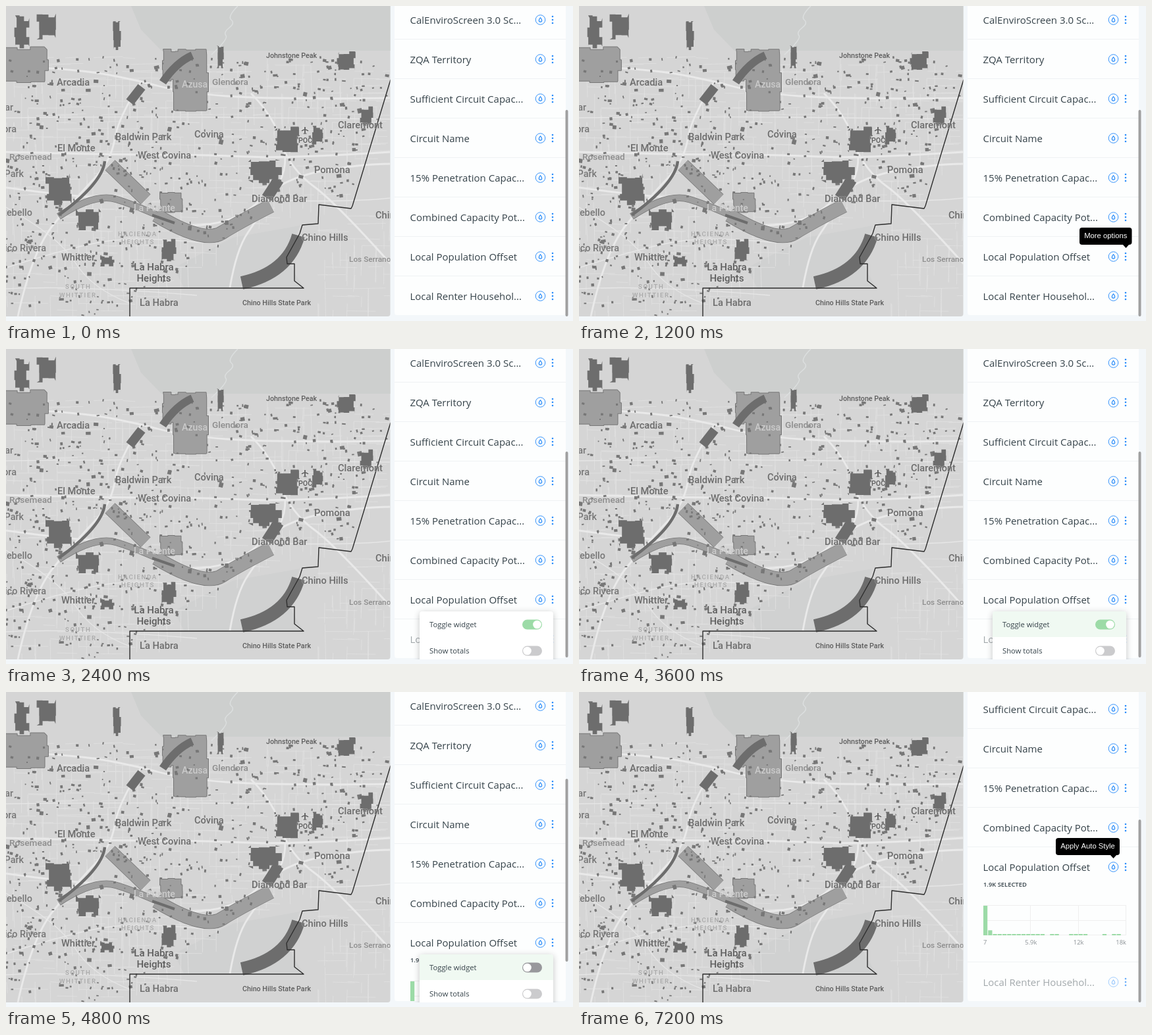
An HTML page with a canvas that plays this animation: 861 by 479 pixels, repeating every 8 s.

```html
<!DOCTYPE html>
<html lang="en">
<head>
<meta charset="utf-8">
<title>Map widgets</title>
<style>
html, body { margin: 0; width: 100%; height: 100%; overflow: hidden; background: #f3f7fa; }
canvas { display: block; width: 861px; height: 479px; }
</style>
</head>
<body>
<canvas id="stage" width="861" height="479"></canvas>
<script>
const W = 861, H = 479, LOOP = 8000, MAP_W = 584, MAP_H = 472;
const ctx = document.getElementById('stage').getContext('2d');
const UI = '"Open Sans", sans-serif', TIP = '"Liberation Sans", Arial, sans-serif';
const BLUE = '#2b8dfa', GREEN = '#9cdba7', INK = '#36434a';
const LAND = '#d5d5d5', DARK = '#6d6d6d', GREY = '#9f9f9f', EDGE = '#777';

function seeded(seed) {
  return () => (seed = (seed * 16807) % 2147483647) / 2147483647;
}
const parse = s => s.split(' ').map(p => p.split(',').map(Number));

// ---- map ----
// Curve through a few key points, rounded at each of them.
function curve(g, points, width, color) {
  const p = parse(points), last = p.length - 1;
  g.beginPath();
  g.moveTo(...p[0]);
  for (let i = 1; i < last; i++) {
    const [x, y] = p[i], [nx, ny] = p[i + 1];
    g.quadraticCurveTo(x, y, i + 1 < last ? (x + nx) / 2 : nx, i + 1 < last ? (y + ny) / 2 : ny);
  }
  if (last === 1) g.lineTo(...p[1]);
  g.lineWidth = width;
  g.strokeStyle = color;
  g.stroke();
}
function polygon(g, points) {
  g.beginPath();
  points.forEach(p => g.lineTo(...p));
}
// Box with stepped sides, like the outline of a parcel or a small city.
function steppedBox(rnd, [x, y, w, h], jag) {
  const points = [];
  for (let side = 0; side < 4; side++) {
    for (let k = 0; k < 3; k++) {
      const d = rnd() * jag;
      for (const a of [0.08 + k * 0.28, 0.36 + k * 0.28]) {
        const [u, v] = [[a, d], [1 - d, a], [1 - a, 1 - d], [d, 1 - a]][side];
        points.push([x + u * w, y + v * h]);
      }
    }
  }
  return points;
}

const HIGHWAYS = [
  '0,91 110,96 200,113 270,132 400,142 584,140',
  '0,222 150,226 300,226 430,232 584,222',
  '0,276 100,290 190,292 240,336 350,330 420,262 540,240 584,240',
  '206,114 170,170 160,235 108,290 40,370 18,472',
  '372,133 400,160 434,240 384,320 350,370 340,428',
  '418,210 434,250 500,298 584,392'
];
const BYROADS = [
  '0,306 80,350 130,430 188,452', '0,398 100,366 200,350 300,360',
  '0,170 200,168 400,170 584,172', '0,430 100,424 290,440', '584,292 530,298 430,296'
];
const CITIES = ['-10,62,74,56', '253,66,55,100', '236,66,40,48', '234,282,34,32'];
const CITY_BANDS = [
  ['158,242 212,294', 20],
  ['80,320 135,284 200,304 245,325', 9],
  ['228,318 300,362 355,328 402,304', 20]
];
const DARK_BOXES = [
  '12,14,24,52', '44,8,32,44', '162,20,13,50', '319,57,12,38', '502,67,30,34', '404,182,44,44',
  '464,182,20,30', '363,230,58,42', '57,250,44,56', '106,305,42,38', '141,380,24,16', '236,354,23,36', '535,152,24,28'
];
const DARK_BANDS = [
  ['238,116 258,86 283,75', 12], ['206,123 188,146', 14], ['414,264 396,292', 17],
  ['358,421 428,406 444,349', 20], ['150,236 146,270 80,318', 4.5], ['222,318 256,330', 4]
];
const BORDER = '584,112 526,304 524,308 475,302 474,331 450,333 446,346 426,382 427,392 438,392 438,418 452,429 188,429 188,472';

// The built-up basin: south of the mountains, west of the county line, north of the hills.
function inBasin(x, y) {
  return y > 78 && x < 586 - (y - 112) * 0.3 && y < Math.max(292, 470 - (x - 180) * 0.72);
}
const inValley = (x, y) => x > 470 && y > 318 - (x - 470) * 0.2;

function streets(g, rnd) {
  g.strokeStyle = '#e1e1e1';
  g.lineWidth = 0.8;
  for (let i = 0; i < 900; i++) {
    const x = Math.round(rnd() * 53) * 11 + rnd() * 2, y = Math.round(rnd() * 43) * 11 + rnd() * 2;
    if (!inBasin(x, y) && !inValley(x, y)) continue;
    const len = 15 + rnd() * 40, across = rnd() < 0.5, lean = rnd() * 3 - 1.5;
    g.beginPath();
    g.moveTo(x, y);
    g.lineTo(x + (across ? len : lean), y + (across ? lean : len));
    g.stroke();
  }
}
function parcels(g, rnd) {
  g.fillStyle = '#777';
  for (let i = 0; i < 1150; i++) {
    const x = rnd() * MAP_W, y = rnd() * MAP_H;
    const big = rnd() < 0.1 ? 3 : 0, w = 1.6 + rnd() * 3 + big, h = 1.6 + rnd() * 3 + big * rnd();
    if (!inBasin(x, y)) continue;
    g.save();
    g.translate(x, y);
    g.rotate((rnd() - 0.5) * 0.6);
    g.fillRect(-w / 2, -h / 2, w, h);
    g.restore();
  }
}
function cities(g, rnd) {
  const shapes = CITIES.map(b => steppedBox(rnd, b.split(',').map(Number), 0.1));
  g.strokeStyle = EDGE;
  g.lineWidth = 2;
  shapes.forEach(s => { polygon(g, s); g.closePath(); g.stroke(); });
  CITY_BANDS.forEach(([p, w]) => curve(g, p, w + 1.6, EDGE));
  g.fillStyle = GREY;
  shapes.forEach(s => { polygon(g, s); g.fill(); });
  CITY_BANDS.forEach(([p, w]) => curve(g, p, w, GREY));
}
function darkAreas(g, rnd) {
  g.fillStyle = DARK;
  for (const b of DARK_BOXES) {
    polygon(g, steppedBox(rnd, b.split(',').map(Number), 0.22));
    g.fill();
  }
  DARK_BANDS.forEach(([p, w]) => curve(g, p, w, DARK));
}

const LABELS = [
  { size: 14.6, color: '#6c6c6c', items: 'Arcadia@77,121 Claremont@504,186 Baldwin Park@166,204 Covina@286,200 El Monte@78,221 ' +
    'West Covina@200,232 Pomona@468,254 Diamond Bar@373,298 Chino Hills@449,357 Chino@561,323 Whittier@84,387 La Habra@203,456' },
  { size: 15, color: '#5e5e5e', align: 'center', items: 'La Habra@224.5,402 Heights@224.5,419' },
  { size: 14, color: '#cbcbcb', items: 'Azusa@267,124 La Puente@194,312' },
  { size: 13.6, color: '#8d8d8d', items: 'Glendora@313,120 Rosemead@5,234' },
  { size: 11.8, color: '#8d8d8d', items: 'Los Serranos@521,389' },
  { size: 10.7, color: '#5c5c5c', items: 'Johnstone Peak@395,79 POC@444,208 Chino Hills State Park@359,455' },
  { size: 9.6, color: '#a9a9a9', gap: 1.6, items: 'HACIENDA@170,350 HEIGHTS@175,362 SOUTH@90,430 WHITTIER@81,443' },
  { size: 14.4, color: '#777', align: 'right', items: 'San Mar@11,159 Alhambra@16,192 Park@27,260 Montebello@40,319 Pico Rivera@61,373' }
];
function labels(g) {
  for (const { size, color, align = 'left', gap = 0, items } of LABELS) {
    g.font = `500 ${size}px Roboto, sans-serif`;
    g.letterSpacing = gap + 'px';
    g.textAlign = align;
    g.fillStyle = color;
    g.strokeStyle = 'rgba(214,214,214,.4)';
    g.lineWidth = 1.6;
    for (const [, name, x, y] of items.matchAll(/([^@]+)@([\d.]+),(\d+) ?/g)) {
      if (color !== '#cbcbcb') g.strokeText(name, x, y);
      g.fillText(name, x, y);
    }
  }
}
function plane(g) {
  curve(g, '454,184 454,194', 1.8, '#606060');
  curve(g, '449,190 454,186 459,190', 1.6, '#606060');
  curve(g, '451.5,194 456.5,194', 1.2, '#606060');
}
function makeMap() {
  const c = document.createElement('canvas');
  c.width = MAP_W; c.height = MAP_H;
  const g = c.getContext('2d'), rnd = seeded(4711);
  g.lineJoin = 'round';
  g.beginPath();
  g.roundRect(0, 0, MAP_W - 0.5, MAP_H, [0, 0, 4, 0]);
  g.clip();
  g.fillStyle = LAND;
  g.fillRect(0, 0, MAP_W, MAP_H);
  g.fillStyle = '#cdcfce';
  polygon(g, parse('190,0 584,0 584,68 236,68 205,36'));
  g.fill();
  g.fillStyle = '#d0d1d1';
  polygon(g, parse('255,398 345,352 446,334 426,385 452,429 270,428'));
  g.fill();
  curve(g, '352,0 336,16 348,26 330,40 338,50 312,74', 1.5, '#dcdfdf');
  streets(g, rnd);
  BYROADS.forEach(p => curve(g, p, 1.4, '#e6e6e6'));
  HIGHWAYS.forEach(p => curve(g, p, 2.8, '#e9e9e9'));
  cities(g, rnd);
  parcels(g, rnd);
  darkAreas(g, rnd);
  g.strokeStyle = '#2d2d2d';
  g.lineWidth = 1.4;
  polygon(g, parse(BORDER));
  g.stroke();
  labels(g);
  plane(g);
  return c;
}
const map = makeMap();

// ---- widget panel ----
const TITLES = ['CalEnviroScreen 3.0 Sc...', 'ZQA Territory', 'Sufficient Circuit Capac...', 'Circuit Name',
  '15% Penetration Capac...', 'Combined Capacity Pot...', 'Local Population Offset', 'Local Renter Househol...'];
const OPEN_ROW = 6, OPEN_EXTRA = 115;
const BARS = '#############.##..####...#.##.';

function box(x, y, w, h, r, fill) {
  ctx.beginPath();
  ctx.roundRect(x, y, w, h, r);
  ctx.fillStyle = fill;
  ctx.fill();
}
function disc(x, y, r, fill) {
  ctx.beginPath();
  ctx.arc(x, y, r, 0, 7);
  ctx.fillStyle = fill;
  ctx.fill();
}
function text(str, x, y, font, color, align = 'left') {
  ctx.font = font;
  ctx.fillStyle = color;
  ctx.textAlign = align;
  ctx.fillText(str, x, y);
}
function dropIcon(x, y) {
  ctx.strokeStyle = BLUE;
  ctx.lineWidth = 0.95;
  ctx.beginPath();
  ctx.arc(x, y, 7.3, 0, 7);
  ctx.stroke();
  ctx.lineWidth = 1.2;
  ctx.beginPath();
  ctx.moveTo(x, y - 3.4);
  ctx.quadraticCurveTo(x + 2.2, y - 0.8, x + 2.2, y + 0.9);
  ctx.arc(x, y + 0.9, 2.2, 0, Math.PI);
  ctx.quadraticCurveTo(x - 2.2, y - 0.8, x, y - 3.4);
  ctx.stroke();
}
function histogram(y) {
  text('1.9K SELECTED', 614, y + 30, `600 9.4px ${UI}`, INK);
  const left = 614, top = y + 58, width = 217, height = 45, pitch = width / BARS.length;
  ctx.fillStyle = '#efefef';
  for (let i = 0; i < 3; i++) {
    ctx.fillRect(left, Math.round(top + i * height / 2), width, 1);
    ctx.fillRect(Math.round(left + (i + 1) * width / 3) - 1, top, 1, height);
  }
  ctx.fillStyle = GREEN;
  [...BARS].forEach((bar, i) => {
    const h = Math.max(2, height * 0.17 ** i);
    if (bar === '#') ctx.fillRect(left + i * pitch, top + height + 1 - h, pitch - 1, h);
  });
  ['7', '5.9k', '12k', '18k'].forEach((s, i) =>
    text(s, left + i * width / 3, y + 118, `9.4px ${UI}`, '#8c9296', ['left', 'center', 'center', 'right'][i]));
}
function panel(s) {
  ctx.save();
  ctx.beginPath();
  ctx.roundRect(590, -6, 260, 476, 4);
  ctx.clip();
  ctx.fillStyle = '#fdfefe';
  ctx.fillRect(590, 0, 260, MAP_H);
  TITLES.forEach((title, i) => {
    const open = s.open && i === OPEN_ROW, faded = s.faded && i > OPEN_ROW;
    const y = 21 + 60 * i - s.scroll + (s.open && i > OPEN_ROW ? OPEN_EXTRA : 0);
    ctx.globalAlpha = faded ? 0.45 : 1;
    text(title, 613.5, y + 6, `15px ${UI}`, INK);
    dropIcon(811.5, y);
    ctx.globalAlpha = faded ? 0.7 : 1;
    for (const d of [-5, 0, 5]) disc(830, y + d, 1.3, BLUE);
    ctx.globalAlpha = 1;
    if (open) histogram(y);
    ctx.fillStyle = '#eff2f4';
    if (i <= OPEN_ROW) ctx.fillRect(590, y + 29 + (open ? OPEN_EXTRA : 0), 260, 1);
  });
  ctx.restore();
  const [top, bottom] = s.thumb;
  box(849.5, top, 4, bottom - top, 2, '#a0a0a0');
}
function toggle(y, on, track) {
  box(784, y - 7.5, 30, 15, 7.5, track);
  disc(on ? 806.5 : 791.5, y, 6.3, '#fff');
}
function menu({ hover, on }) {
  ctx.save();
  ctx.beginPath();
  ctx.rect(590, 0, 260, MAP_H);
  ctx.clip();
  ctx.shadowColor = 'rgba(44,44,44,.28)';
  ctx.shadowBlur = 10;
  ctx.shadowOffsetY = 2;
  box(628, 399, 203, 90, 4, '#fff');
  ctx.shadowColor = 'transparent';
  if (hover) box(628, 399, 203, 39, [4, 4, 0, 0], '#f0f9f2');
  text('Toggle widget', 643, 423, `11.25px ${UI}`, INK);
  text('Show totals', 643, 463, `11.25px ${UI}`, INK);
  toggle(419, on, on ? GREEN : '#98989c');
  toggle(459, false, '#cbcbcd');
  ctx.restore();
}
function tooltip({ str, x, y, w, tip }) {
  box(x, y, w, 26, 4, '#000');
  ctx.beginPath();
  ctx.moveTo(tip - 5, y + 25.5);
  ctx.lineTo(tip + 5, y + 25.5);
  ctx.lineTo(tip, y + 31);
  ctx.fill();
  text(str, x + w / 2, y + 16, `11.25px ${TIP}`, '#fff', 'center');
}

// ---- timeline: each state holds until the next ----
const STATES = [
  { at: 0, scroll: 0, thumb: [158, 472] },
  { at: 1200, scroll: 0, thumb: [158, 472], tip: { str: 'More options', x: 760, y: 337, w: 79.5, tip: 830.5 } },
  { at: 2400, scroll: 0, thumb: [156, 469], faded: true, menu: { on: true } },
  { at: 3600, scroll: 0, thumb: [156, 469], faded: true, menu: { on: true, hover: true } },
  { at: 4800, scroll: 0, thumb: [132, 410], faded: true, open: true, menu: { hover: true } },
  { at: 7200, scroll: 115, thumb: [194, 472], faded: true, open: true, tip: { str: 'Apply Auto Style', x: 724, y: 222, w: 97, tip: 811.5 } }
];
function draw(t) {
  const s = STATES.filter(v => v.at <= t).pop();
  ctx.fillStyle = '#f3f7fa';
  ctx.fillRect(0, 0, W, H);
  ctx.drawImage(map, 0, 0);
  panel(s);
  if (s.menu) menu(s.menu);
  if (s.tip) tooltip(s.tip);
}
const start = performance.now();
function tick() {
  draw((performance.now() - start) % LOOP);
  requestAnimationFrame(tick);
}
tick();
</script>
</body>
</html>
```
